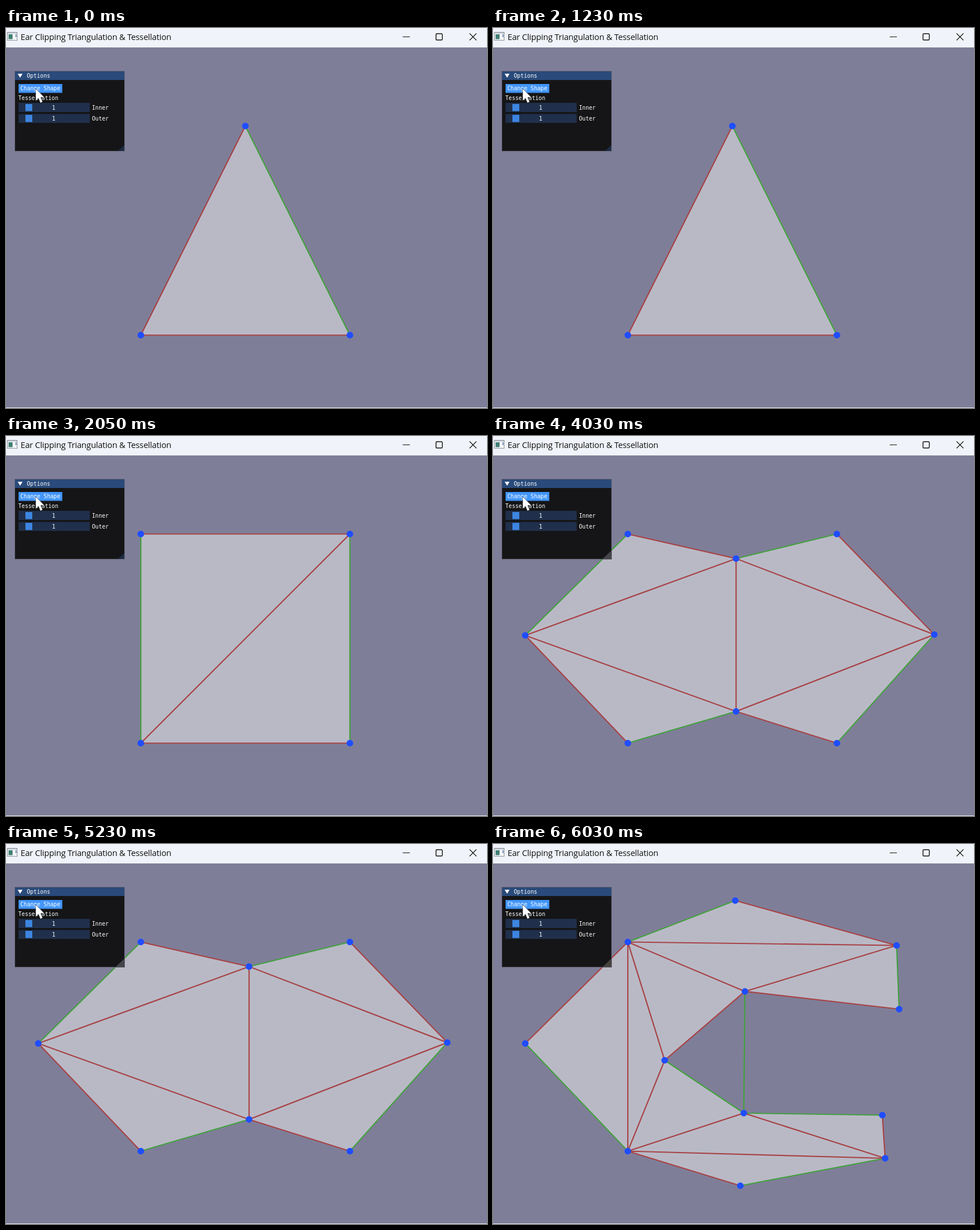
Animation of 842x665 px, one loop 8010 ms. Source, as an HTML page:

```html
<!DOCTYPE html>
<html lang="en">
<head>
<meta charset="utf-8">
<title>Ear Clipping Triangulation &amp; Tessellation</title>
<style>
html, body { margin: 0; width: 100%; height: 100%; overflow: hidden; background: #7f7e99; }
svg { display: block; width: 842px; height: 665px; }
.title { font: 14.6px "Open Sans", "Noto Sans", sans-serif; letter-spacing: -.2px; fill: #111; }
.ui text { font: 9.7px "DejaVu Sans Mono", "Liberation Mono", monospace; fill: #fff; }
.fill { fill: #b9b9c6; }
.red, .green { fill: none; stroke-width: 2.2; }
.red { stroke: #a74446; }
.green { stroke: #44a03f; }
.dot { fill: #1f4dff; }
.s0, .s1, .s2, .s3 { visibility: hidden; animation: 8010ms step-end infinite; }
.s0 { animation-name: first; }
.s1 { animation-name: second; }
.s2 { animation-name: third; }
.s3 { animation-name: fourth; }
@keyframes first { 0% { visibility: visible; } 25.593%, 100% { visibility: hidden; } }
@keyframes second { 0% { visibility: hidden; } 25.593% { visibility: visible; } 50.312%, 100% { visibility: hidden; } }
@keyframes third { 0% { visibility: hidden; } 50.312% { visibility: visible; } 75.281%, 100% { visibility: hidden; } }
@keyframes fourth { 0% { visibility: hidden; } 75.281%, 100% { visibility: visible; } }
</style>
</head>
<body>
<svg viewBox="0 0 842 665">
  <rect width="842" height="665" fill="#7f7e99"/>
  <rect y="664" width="842" height="1" fill="#e9e9ef"/>

  <g id="shapes"></g>

  <!-- window bar -->
  <rect width="842" height="34" fill="#f0f3f9"/>
  <g>
    <rect x="2.5" y="7.5" width="17" height="14" fill="#f4f5f7" stroke="#8b9097"/>
    <rect x="3" y="8" width="16" height="2" fill="#c9cfd6"/>
    <rect x="4.5" y="11" width="7" height="8.5" fill="#3f7f74"/>
    <path d="M17.5 11v5" stroke="#5678a8" stroke-width="1.5"/>
  </g>
  <text class="title" x="25.5" y="21">Ear Clipping Triangulation &amp; Tessellation</text>
  <g fill="none" stroke="#111" stroke-width="1.2">
    <path d="M694.5 15.5h12.5M811.5 9.5l12 12m0-12l-12 12"/>
    <rect x="752.7" y="10" width="11" height="11" rx="1.5" stroke-width="1.4"/>
  </g>

  <!-- options panel -->
  <g class="ui">
    <rect x="15.5" y="75.5" width="192" height="140" fill="#151517" stroke="#5f5f70"/>
    <rect x="16" y="76" width="191" height="15" fill="#294a7a"/>
    <path d="M207 205v10h-11z" fill="#1c2c42"/>
    <path class="s2" d="M207.500 200v15.500h-16z" fill="#454549"/>
    <path class="s3" d="M207.500 200v15.500h-16z" fill="#46413d"/>
    <path d="M20.500 80h8.500l-4.250 7z" fill="#fff"/>
    <rect x="22" y="98" width="76.500" height="15.500" fill="#4296fa"/>
    <g fill="#20304c">
      <rect x="22" y="131" width="124.500" height="16"/>
      <rect x="22" y="150.500" width="124.500" height="15.500"/>
    </g>
    <g fill="#3d85e0">
      <rect x="34" y="133" width="12" height="12.500"/>
      <rect x="34" y="152" width="12" height="12.500"/>
    </g>
    <text x="36.500" y="87">Options</text>
    <text x="25" y="109">Change Shape</text>
    <text x="21.500" y="126">Tessellation</text>
    <text x="80.500" y="143">1</text>
    <text x="80.500" y="162">1</text>
    <text x="150.500" y="143">Inner</text>
    <text x="150.500" y="162">Outer</text>
  </g>

  <path d="M52 106v21.500l4.800-4.500 3.400 8 4-1.700-3.400-7.800h6.400z" fill="#fff" stroke="#222" stroke-width=".5"/>
</svg>

<script>
const spots = {
  A: [236, 171.5], B: [425.5, 214.5], C: [602, 171.5], D: [772.5, 347.5],
  E: [602, 537.5], F: [425.5, 482], G: [236, 537.5], H: [56.5, 349],
  N: [419, 171.5], P: [424, 99], Q: [706.5, 177.5], R: [711, 289],
  S: [441, 258], T: [300.5, 378.5], U: [439, 471], V: [681.5, 474.5],
  W: [686.5, 550], X: [433, 598]
};

// outline, then red and green strokes as chains of spots
const shapes = [
  ['NEG', 'NGE', 'NE'],
  ['ACEG', 'ACGE', 'AG CE'],
  ['ABCDEFGH', 'ABHFBDFE HG CD', 'HA BC GF ED'],
  ['APQRSTUVWXGH', 'PQASQ RSTAGTGUWGX AH VW', 'AP QR SU TUV XW HG']
];

const trace = chains => chains.split(' ')
  .map(chain => 'M' + [...chain].map(k => spots[k]).join('L')).join('');

document.getElementById('shapes').innerHTML = shapes.map(([outline, red, green], i) => {
  const dots = [...outline].map(k =>
    `<circle class="dot" cx="${spots[k][0]}" cy="${spots[k][1]}" r="5.8"/>`).join('');
  return `<g class="s${i}"><path class="fill" d="${trace(outline)}Z"/>
    <path class="green" d="${trace(green)}"/><path class="red" d="${trace(red)}"/>${dots}</g>`;
}).join('');
</script>
</body>
</html>
```
